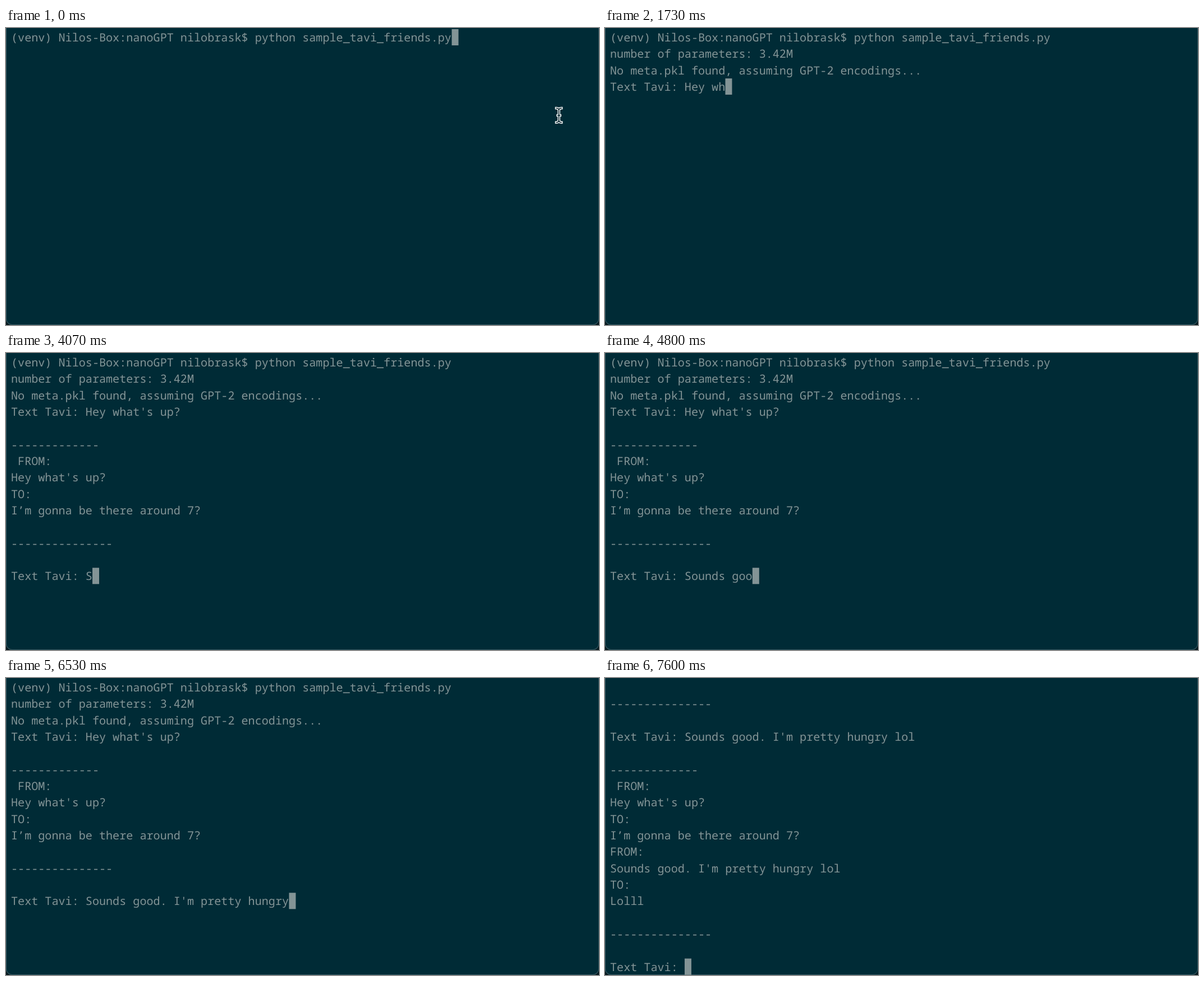
These frames come from a looping animation (1057x530 px, 8000 ms). An HTML page:

```html
<!DOCTYPE html>
<html lang="en">
<head>
<meta charset="utf-8">
<title>Terminal chat</title>
<style>
  html, body { margin: 0; width: 100%; height: 100%; overflow: hidden; background: #06191f; }
  #window {
    position: absolute; left: 0; top: 0; width: 1057px; height: 530px; overflow: hidden;
    box-sizing: border-box; background: #002b36; border: solid #3a5b64;
    border-width: 0 1px 1px; border-radius: 0 0 11px 11px;
  }
  #screen, #cursor, svg { position: absolute; left: 0; top: 0; }
  #screen {
    left: 9px; top: 2px; margin: 0; color: #839496; white-space: pre;
    font: 20.14px/29.33px "Noto Sans Mono", monospace;
    font-variant-ligatures: none; text-rendering: geometricPrecision;
  }
  #cursor { width: 12px; height: 29.33px; background: #839496; }
  #pointer path { fill: none; stroke: #fff; stroke-width: 4.6; stroke-linecap: square; }
  #pointer path + path { stroke: #06242d; stroke-width: 1.7; }
</style>
</head>
<body>
<div id="window"></div>
<pre id="screen"></pre>
<div id="cursor"></div>
<svg id="pointer" width="1057" height="530">
  <path d="M981 143Q985.5 143 985.5 147V164Q985.5 168.5 981 168.5M990 143Q985.5 143 985.5 147M985.5 164Q985.5 168.5 990 168.5M983.5 156H987.5"/>
  <path d="M981 143Q985.5 143 985.5 147V164Q985.5 168.5 981 168.5M990 143Q985.5 143 985.5 147M985.5 164Q985.5 168.5 990 168.5M983.5 156H987.5"/>
</svg>
<script>
const LOOP = 8000, ROWS = 18, CELL_W = 12.085, CELL_H = 29.33;
const screen = document.getElementById('screen');
const cursor = document.getElementById('cursor');
const pointer = document.getElementById('pointer');

const prompt = 'Text Tavi: ';
const firstChat = "Hey what's up?\nTO:\nI’m gonna be there around 7?\n";
const reply = "FROM:\nSounds good. I'm pretty hungry lol\nTO:\nLolll\n";
const block = chat =>
  `\n${'-'.repeat(13)}\n FROM:\n${chat}\n${'-'.repeat(15)}\n\n${prompt}`;

// [text, time of first character, time of last character]; no last time = all at once
const script = [
  ['(venv) Nilos-Box:nanoGPT nilobrask$ python sample_tavi_friends.py', 0],
  ['\n', 70],
  ['number of parameters: 3.42M\n', 530],
  ['No meta.pkl found, assuming GPT-2 encodings...\n' + prompt, 600],
  ["Hey what's ", 1330, 2070],
  ['up', 2200],
  ['?', 2600],
  ['\n', 2800],
  [block(firstChat), 3000],
  ['Sounds goo', 4070, 4800],
  ['d', 4870],
  ['.', 4930],
  [' ', 5200],
  ["I'm pretty h", 5400, 6200],
  ['ungry', 6270, 6530],
  [' lol', 6615, 6870],
  ['\n', 7200],
  [block(firstChat + reply), 7400],
];

function shown([text, start, end], t) {
  if (t < start) return '';
  if (!end) return text;
  return text.slice(0, 1 + Math.floor((t - start) / (end - start) * (text.length - 1)));
}

function draw(t) {
  const lines = script.map(part => shown(part, t)).join('').split('\n').slice(-ROWS);
  const text = lines.join('\n');
  if (screen.textContent !== text) screen.textContent = text;
  const x = 9 + lines.at(-1).length * CELL_W;
  const y = 2 + (lines.length - 1) * CELL_H;
  cursor.style.transform = `translate(${x}px, ${y}px)`;
  pointer.style.display = t < 70 ? '' : 'none';
}

const begin = performance.now();
function tick() {
  draw((performance.now() - begin) % LOOP);
  requestAnimationFrame(tick);
}
tick();
</script>
</body>
</html>
```
